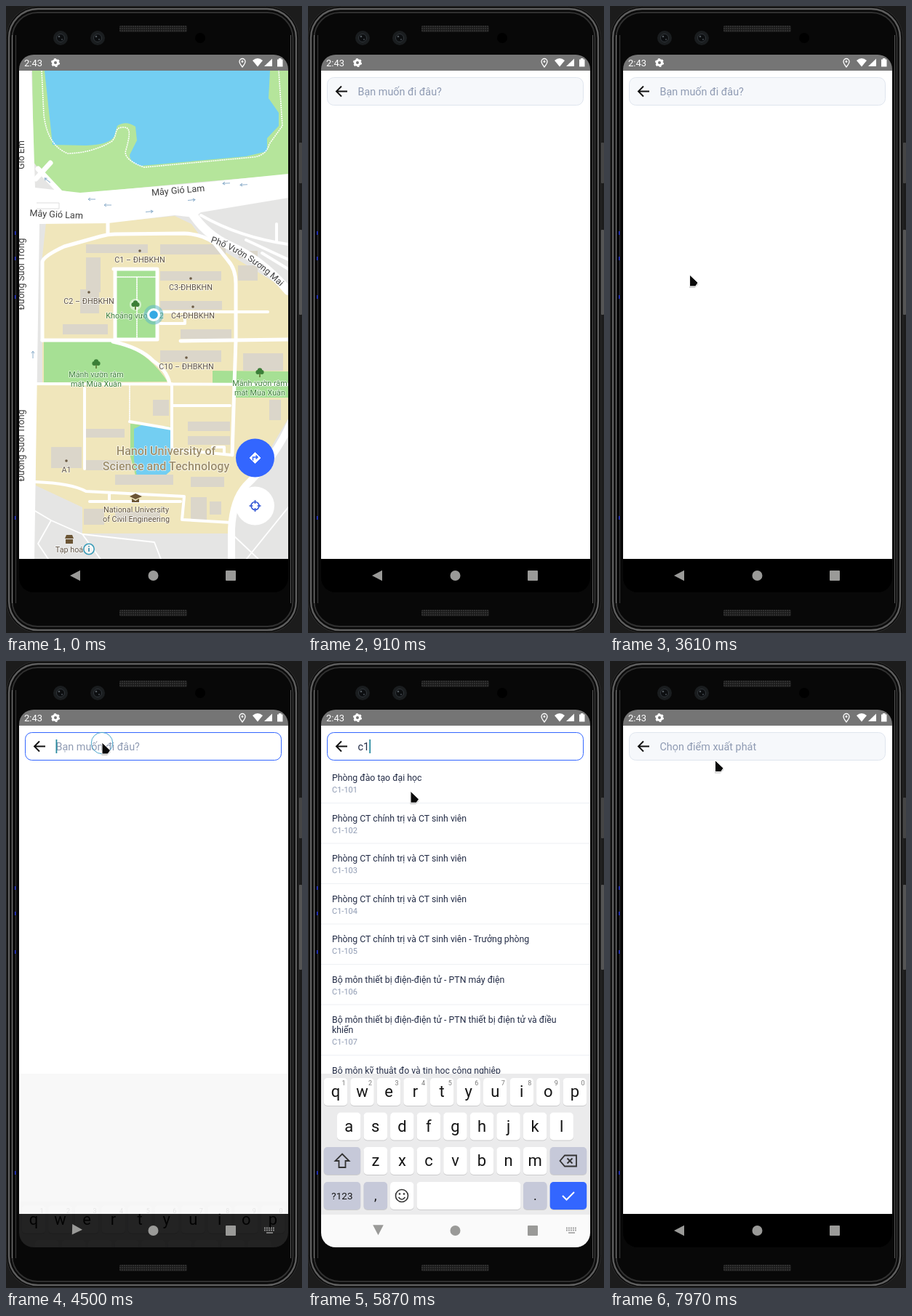
Recreate the animation shown at these times as an HTML page. Size 407 by 863 pixels, loop 8 s.

```html
<!DOCTYPE html>
<html lang="vi">
<meta charset="utf-8">
<title>Campus search</title>
<style>
  html, body { margin: 0; width: 100%; height: 100%; overflow: hidden; background: #1c1c1c }
  svg { display: block; width: 407px; height: 863px; font-family: Roboto, sans-serif }
  .mid { text-anchor: middle }
  .halo { paint-order: stroke; stroke: #fffc; stroke-width: 1.6px; stroke-linejoin: round }
  .road { fill: none; stroke: #fff; stroke-linejoin: round; stroke-linecap: round }
</style>
<svg id="stage" viewBox="0 0 407 863"></svg>
<script>
const rect = (x, y, w, h, fill, rx = 0, more = '') =>
  `<rect x="${x}" y="${y}" width="${w}" height="${h}" fill="${fill}" rx="${rx}" ${more}/>`;
const disc = (x, y, r, fill, more = '') => `<circle cx="${x}" cy="${y}" r="${r}" fill="${fill}" ${more}/>`;
const shape = (d, fill, more = '') => `<path d="${d}" fill="${fill}" ${more}/>`;
const line = (d, color, w, more = '') => shape(d, 'none', `stroke="${color}" stroke-width="${w}" ${more}`);
const road = (d, w = 5, more = '') => `<path class="road" d="${d}" stroke-width="${w}" ${more}/>`;
const text = (x, y, s, size, fill, more = '') =>
  `<text x="${x}" y="${y}" font-size="${size}" fill="${fill}" ${more}>${s}</text>`;
const label = (x, y, s, fill = '#5e5243', size = 10.8, more = '') =>
  text(x, y, s, size, fill, `class="mid halo" ${more}`);

function phone() {
  const edge = (x, c, w = 1) => line(`M${x} 40V822`, c, w);
  const grille = y => rect(156, y, 93, 9, 'url(#mesh)', 2);
  const camera = x => disc(x, 44, 10, '#1a1d1f') + disc(x, 44, 5.5, '#0c0e10', 'stroke="#30353a"') +
    disc(x - 2, 42, 1.3, '#50575c') + disc(x + 2, 46, 1, '#454b50');
  return rect(0, 0, 407, 863, '#1c1c1c') +
    rect(403, 188, 4, 56, '#454545', 1) + rect(403, 308, 4, 117, '#555', 1) +
    rect(.5, .5, 402, 862, '#0a0a0a', 44, 'stroke="#2c2c2c"') +
    rect(4, 4, 395, 855, 'none', 40, 'stroke="#5e5e5e" stroke-width="2.4"') +
    rect(8.5, 9, 386, 845, '#080808', 35, 'stroke="#303030" stroke-width="2"') +
    edge(8.5, '#777') + edge(13.5, '#3c3c3c') + edge(391.5, '#555') +
    [310, 345, 398, 702].map(y => rect(12, y, 1.5, 5, '#1a2bd0')).join('') +
    grille(27) + grille(831) + camera(75) + camera(126) + disc(267, 44, 7, '#000');
}

const buildings = [
  [110, 328, 85, 12], [212, 328, 90, 14], [110, 346, 20, 48], [102, 390, 26, 33], [78, 438, 62, 14],
  [212, 365, 84, 13], [212, 406, 85, 12], [240, 445, 70, 13], [212, 474, 84, 16], [319, 357, 27, 21],
  [320, 337, 26, 10], [326, 478, 55, 24], [202, 542, 22, 22], [110, 582, 53, 12], [62, 607, 42, 29],
  [110, 625, 62, 14], [150, 645, 80, 14], [250, 572, 58, 13], [250, 592, 58, 12], [254, 648, 46, 14],
  [254, 676, 22, 31], [280, 682, 16, 18], [107, 692, 28, 22], [150, 696, 62, 14], [362, 542, 16, 28]];

function map() {
  const water = '#73cef2', grass = '#b5e59b', park = '#a6e094', leaf = '#3c7f38', soil = '#f0e6bb';
  const place = (x, y, s) => disc(x, y - 12, 1.8, '#6b5b45') + label(x, y + 4, s);
  const tree = (x, y) => shape(`M${x - 1} ${y + 1}h2v6h-2z`, '#6a8a44') +
    disc(x - 2.6, y, 3, leaf) + disc(x + 2.6, y, 3, leaf) + disc(x, y - 2.5, 3.2, leaf);
  const garden = (x, y) => tree(x, y - 18) + label(x, y + 1, 'Mảnh vườn râm', leaf) +
    label(x, y + 14, 'mát Mùa Xuân', leaf);
  const street = (x, y, turn, s, size = 12.6) =>
    label(0, 0, s, '#3d3d3d', size, `transform="translate(${x} ${y}) rotate(${turn})"`);
  const arrow = (x, y, turn) =>
    line('M5 0H-5M-2-2L-5 0L-2 2', '#8fb0cc', 1, `transform="translate(${x} ${y}) rotate(${turn})"`);

  return rect(18, 89, 370, 672, '#e5e5e4') +
    shape('M36 89H388V232L270 242L100 258L66 252L38 215Z', grass) +
    shape('M53 89H363L361 127L375 147V165L359 182V200L330 207L185 220Q171 217 170 205L180 185L178 166Q165 157 153 165L149 179Q143 191 110 192L64 191Z', water) +
    line('M49 89L52 150Q57 192 85 203Q120 202 146 186C154 176 148 168 160 167S171 176 165 198Q160 211 190 222L340 208Q358 206 362 190L380 165L375 89', '#fff', 1.6, 'stroke-dasharray="2 1"') +
    shape('M55 298L140 298L232 289L255 300L268 318L312 345L388 392V568L345 640L318 672L306 726H105V690L41 660V520H50V345Z', soil) +
    shape('M150 364H207V459H150ZM52 462H150Q195 475 222 517L52 518ZM284 502L388 503V539H313V521H284Z', park) +
    shape('M171 575L226 579V640L218 646H178L171 620Z', park) +
    shape('M176 582L186 577L226 580V640L218 647H180L176 625Z', water) +
    buildings.map(b => rect(...b, '#dbd6ca')).join('') +
    shape('M18 89H35L40 250L102 257L270 243L388 231V264L268 284L259 291L232 288L140 299L46 300L39 761H18Z', '#fff') +
    line('M42 271H73V279H42', '#ddd', 1) + road('M41 238L61 216M44 224L74 256', 7) +
    road('M255 284Q275 316 310 331Q352 350 388 392', 12) +
    road('M268 288Q320 318 388 328M330 322L388 349M352 340L388 362M372 300V325', 4) +
    road('M50 460V352Q52 344 80 331L130 317Q140 314 150 314L245 313Q270 314 286 326L305 350Q316 362 316 382L316 460L314 520L311 618') +
    road('M140 296V314M50 460H150M148 362H208V459H150V362M240 461L388 459M147 462Q184 470 202 488Q222 502 225 520') +
    road('M41 520L388 521M108 526V637M170 572L228 582M228 520V608M228 550H308M228 610L310 618', 4) +
    road('M205 421H360M212 437H246V430', 4) + road('M170 521V572M151 373H206M180 373V458', 1.6, 'stroke-dasharray="2 1"') +
    road('M41 655Q90 657 110 668L245 675L242 707L310 711M115 682H240M142 670V682M300 617V607H284', 4) +
    road('M392 572Q372 620 330 660Q312 680 310 720V764', 10) +
    road('M18 682L62 708L105 727L204 738L214 764M62 708L44 740L60 764M105 727L132 764M312 728L350 764M388 690L330 762', 1.8) +
    arrow(118, 266, 0) + arrow(140, 274, 0) + arrow(197, 283, 175) + arrow(255, 267, 175) +
    arrow(303, 244, -4) + arrow(327, 246, -4) + arrow(37, 480, 90) + arrow(57, 240, 40) +
    street(237, 258, -5, 'Mây Gió Lam') + street(69, 291, 3, 'Mây Gió Lam') +
    street(25, 205, -90, 'Gió Êm', 12.4) + street(25, 369, -90, 'Đường Suối Trong', 12.4) +
    street(25, 605, -90, 'Đường Suối Trong', 12.4) +
    '<path id="bend" d="M281 325Q333 342 380 389" fill="none"/>' +
    '<text class="halo" font-size="12.2" fill="#3d3d3d"><textPath href="#bend">Phố Vườn Sương Mai</textPath></text>' +
    place(184, 349, 'C1 – ĐHBKHN') + place(254, 387, 'C3-ĐHBKHN') + place(114, 406, 'C2 – ĐHBKHN') +
    place(257, 426, 'C4-ĐHBKHN') + place(248, 496, 'C10 – ĐHBKHN') + place(83, 638, 'A1') +
    disc(178, 411, 8, '#fff8') + tree(178, 411) + label(177, 430, 'Khoảng vườn G2', leaf) +
    garden(124, 510) + garden(349, 522) +
    label(220, 618, 'Hanoi University of', '#9c8d6a', 16.1, 'font-weight="500"') +
    label(220, 639, 'Science and Technology', '#9c8d6a', 16.1, 'font-weight="500"') +
    shape('M170 675L178 671L187 675L178 679ZM173 678L178 681L183 678V683H173Z', '#6b5535') +
    label(179, 697, 'National University', '#5e4f38') + label(179, 710, 'of Civil Engineering', '#5e4f38') +
    shape('M83 728H91L93 733H81ZM82 734H92V740H82Z', '#6b5535') + label(87, 752, 'Tạp hoá') +
    disc(114, 747.5, 7.2, '#fff8', 'stroke="#3a9cb8" stroke-width="1.6"') + line('M114 746V751M114 743V744.6', '#2b87a5', 1.6) +
    disc(203, 425, 13.5, '#5bb5c888') + disc(203, 425, 9, '#fff') + disc(203, 425, 5.8, '#35a9e4') +
    disc(342.5, 622, 26.5, '#3366ff') + shape('M342.5 614.5L350 622L342.5 629.5L335 622Z', '#fff', 'stroke="#fff" stroke-linejoin="round"') +
    line('M339.5 625.5V621H345.5M343.5 618.5L346 621L343.5 623.5', '#3366ff', 1.5) +
    disc(342.5, 688, 26.5, '#fff') +
    line('M342.5 680V685M342.5 691V696M334.5 688H339.5M345.5 688H350.5', '#3457d5', 1.6) +
    disc(342.5, 688, 5.5, 'none', 'stroke="#3457d5" stroke-width="1.6"');
}

function results() {
  const office = 'Phòng CT chính trị và CT sinh viên', lab = 'Bộ môn thiết bị điện-điện tử - PTN ';
  const tech = 'Bộ môn kỹ thuật đo và tin học công nghiệp';
  const titles = ['Phòng đào tạo đại học', office, office, office, office + ' - Trưởng phòng', lab + 'máy điện',
    lab + 'thiết bị điện tử và điều|khiển', tech, tech, tech, lab + 'chuyên đề'];
  let y = 165, out = '';
  titles.forEach((title, i) => {
    title.split('|').forEach((part, n) => {
      if (n) y += 14;
      out += text(33, y, part, 12.3, '#222b45');
    });
    out += text(33, y + 16, 'C1-' + (101 + i), 11, '#8f9bb3') + rect(18, y + 30, 370, 1, '#edf0f4');
    y += 55.5;
  });
  return out;
}

function keyboard() {
  const key = (x, y, w, s = '', fill = '#fff', size = 22) =>
    rect(x, y + 1, w, 38, '#0002', 5) + rect(x, y, w, 38, fill, 5) +
    text(x + w / 2, y + 19 + size * .34, s, size, '#151515', 'class="mid"');
  const row = (keys, x, y) => [...keys].map((k, i) => key(x + i * 36.55, y, 32.5, k)).join('');
  const grey = '#c6c9d9', ink = '#333';
  return rect(18, 568, 370, 194, '#ebebec') + rect(18, 762, 370, 45, '#fafafa') +
    row('qwertyuiop', 21.7, 574) +
    [...'1234567890'].map((n, i) => text(49 + i * 36.55, 584, n, 9, '#777', 'class="mid"')).join('') +
    row('asdfghjkl', 40, 621.5) + row('zxcvbnm', 76.6, 669) +
    key(21.7, 669, 50.5, '', grey) + key(332.7, 669, 50.5, '', grey) +
    key(21.7, 717, 50.5, '?123', grey, 13.5) + key(76.6, 717, 32.5, ',', grey, 18) + key(113, 717, 32.5) +
    key(149.5, 717, 143, '') + key(296, 717, 32.5, '.', grey, 18) + key(332.7, 717, 50.5, '', '#3366ff') +
    line('M47 678.5L56.5 688H51.5V697H42.5V688H37.5Z', ink, 1.8) +
    line('M353 680.5H369V695.5H353L346.5 688ZM356.5 684.5L363.5 691.5M363.5 684.5L356.5 691.5', ink, 1.8) +
    disc(129, 736, 8.5, 'none', `stroke="${ink}" stroke-width="1.6"`) + disc(126, 733.5, 1.3, ink) + disc(132, 733.5, 1.3, ink) +
    line('M124.5 738Q129 744 133.5 738', ink, 1.5) + line('M350 736L355.5 741.5L366 731', '#fff', 2);
}

function statusBar() {
  const w = '#fff';
  return rect(18, 67, 370, 22, '#757575') + text(25, 83, '2:43', 13, w) +
    disc(68, 78, 3.5, 'none', `stroke="${w}" stroke-width="3"`) +
    disc(68, 78, 5.3, 'none', `stroke="${w}" stroke-width="1.6" stroke-dasharray="2.8 2.75"`) +
    line('M325 84Q321 79 321 76.5A4 4 0 0 1 329 76.5Q329 79 325 84Z', w, 1.3) + disc(325, 76.5, 1.4, w) +
    shape('M339 75Q346 69 353 75L346 83.5Z', w) + shape('M355 83L366 72.5V83Z', w) +
    shape('M373 73.5H375V72H378.5V73.5H380.5V83.5H373Z', w);
}

document.getElementById('stage').innerHTML = `
  <defs>
    <pattern id="mesh" width="3" height="3" patternUnits="userSpaceOnUse">${rect(0, 0, 3, 3, '#191919') + rect(0, 0, 2, 2, '#303030')}</pattern>
    <clipPath id="screen">${rect(18, 67, 370, 740, '#000', 20)}</clipPath>
    <clipPath id="app">${rect(18, 89, 370, 672, '#000')}</clipPath>
  </defs>
  ${phone()}
  <g clip-path="url(#screen)">
    <g clip-path="url(#app)">
      ${map()}
      <g id="page">
        ${rect(18, 89, 370, 672, '#fff', 0, 'id="sheet"')}
        <g id="list">${results()}</g>
        <g id="bar">
          ${rect(26.5, 98.5, 352, 38, '#f6f8fb', 9, 'id="field"')}
          ${line('M54 117.5H39.5M46 110.5L39 117.5L46 124.5', '#111', 1.9)}
          ${text(68.5, 123, '', 14.4, '#8f9bb3', 'id="hint"')}
          ${text(68.5, 123, '', 14.4, '#222b45', 'id="query"')}
          ${rect(0, 108, 1.8, 19, '#2b8ca0', 0, 'id="caret"')}
        </g>
        ${rect(18, 568, 370, 193, '#f8f8f8', 0, 'id="gap"')}
      </g>
    </g>
    ${rect(18, 761, 370, 46, '#000')}
    <g id="keys">${keyboard()}</g>
    <g fill="#9a9a98">
      <path id="back" d="M-8.5 0L5.5-7.3V7.3Z"/>
      <circle cx="202.5" cy="784" r="7"/><rect x="302" y="777" width="14" height="14" rx="1"/>
    </g>
    <g id="switch">${line('M355 780.5H370M355 783.5H370', '#999', 1.8, 'stroke-dasharray="1.8 1.2"') + line('M358 787H367', '#999', 1.6)}</g>
    ${statusBar()}
  </g>
  ${disc(0, 0, 0, '#6cc6f0', 'id="ring" stroke="#4ba6cc"')}
  <g id="cursor">${shape('M-.5 1L12 13L7 18H-.5Z', '#0003') + shape('M0 0L11.5 11L8 16H0Z', '#0a0a0a', 'stroke="#fff" stroke-width="1"')}</g>`;

const el = Object.fromEntries([...document.querySelectorAll('[id]')].map(e => [e.id, e]));
const set = (id, attrs) => { for (const k in attrs) el[id].setAttribute(k, attrs[k]); };
const span = (t, from, to) => Math.min(1, Math.max(0, (t - from) / (to - from)));
const within = (t, from, to) => t >= from && t < to;
const show = (id, on) => set(id, { visibility: on ? 'visible' : 'hidden' });

// time, x, y
const cursorPath = [
  [3130, 143, 783], [3380, 118, 560], [3600, 109, 380], [3780, 118, 215], [3930, 131, 132], [4100, 132, 112],
  [5470, 132, 112], [5680, 143, 145], [5870, 141, 179], [6030, 141, 211],
  [7690, 141, 211], [7830, 140, 170], [7970, 144.5, 136.5], [8000, 144.5, 136.5]];
// start, x, y
const taps = [[500, 345, 612], [2580, 158.5, 105.5], [4230, 132, 113], [6350, 141, 208]];

function draw(t) {
  const open = span(t, 615, 910), swap = span(t, 7050, 7400);
  // sheet and bar fade separately, so the bar covers the map more than the sheet does
  set('sheet', { opacity: open });
  set('bar', { opacity: open });
  set('page', { transform: `translate(0 ${48 * (1 - open) ** 2})` });

  const typed = t < 4870 ? '' : t < 5470 ? 'c' : 'c1';
  const focused = within(t, 4290, 6380);
  set('field', { fill: focused ? '#fff' : '#f6f8fb', stroke: focused ? '#3366ff' : '#dfe5ee' });
  el.hint.textContent = t < 7050 ? 'Bạn muốn đi đâu?' : 'Chọn điểm xuất phát';
  set('hint', { opacity: typed ? swap : 1 });
  el.query.textContent = typed;
  set('query', { opacity: 1 - swap });
  set('caret', { x: 68.5 + typed.length * 7.9 });
  show('caret', focused && !within(t, 4780, 4870) && t < 5970);
  set('list', { opacity: t < 5120 ? 0 : 1 - swap });
  show('gap', within(t, 4400, 6420));

  const rise = span(t, 4440, 4670), fall = span(t, 6550, 6770);
  set('keys', {
    opacity: rise ** 1.5 * (1 - fall) ** 2,
    transform: `translate(0 ${239 * (1 - rise + fall ** 1.4)})`
  });
  const turn = 270 * (span(t, 4400, 4550) - span(t, 6600, 6770));
  set('back', { transform: `translate(96.5 ${784 - turn / 120}) rotate(${turn})` });
  show('switch', within(t, 4440, 6560));

  const tap = taps.find(([start]) => within(t, start, start + 320));
  show('ring', tap);
  if (tap) {
    const u = (t - tap[0]) / 320;
    set('ring', { cx: tap[1], cy: tap[2], r: 3.3 + 11.7 * (1 - (1 - u) ** 2), 'fill-opacity': Math.max(0, 1 - 3 * u) });
    set('ring', { stroke: u < .1 ? '#6cc6f0' : '#4ba6cc' });
  }

  show('cursor', within(t, 3130, 5280) || t >= 5470);
  const next = Math.max(1, cursorPath.findIndex(p => p[0] > t));
  const [a, b] = [cursorPath[next - 1], cursorPath[next]];
  const u = span(t, a[0], b[0]);
  set('cursor', { transform: `translate(${a[1] + (b[1] - a[1]) * u} ${a[2] + (b[2] - a[2]) * u})` });
}

const begin = performance.now();
(function tick() {
  draw((performance.now() - begin) % 8000);
  requestAnimationFrame(tick);
})();
</script>
</html>
```
